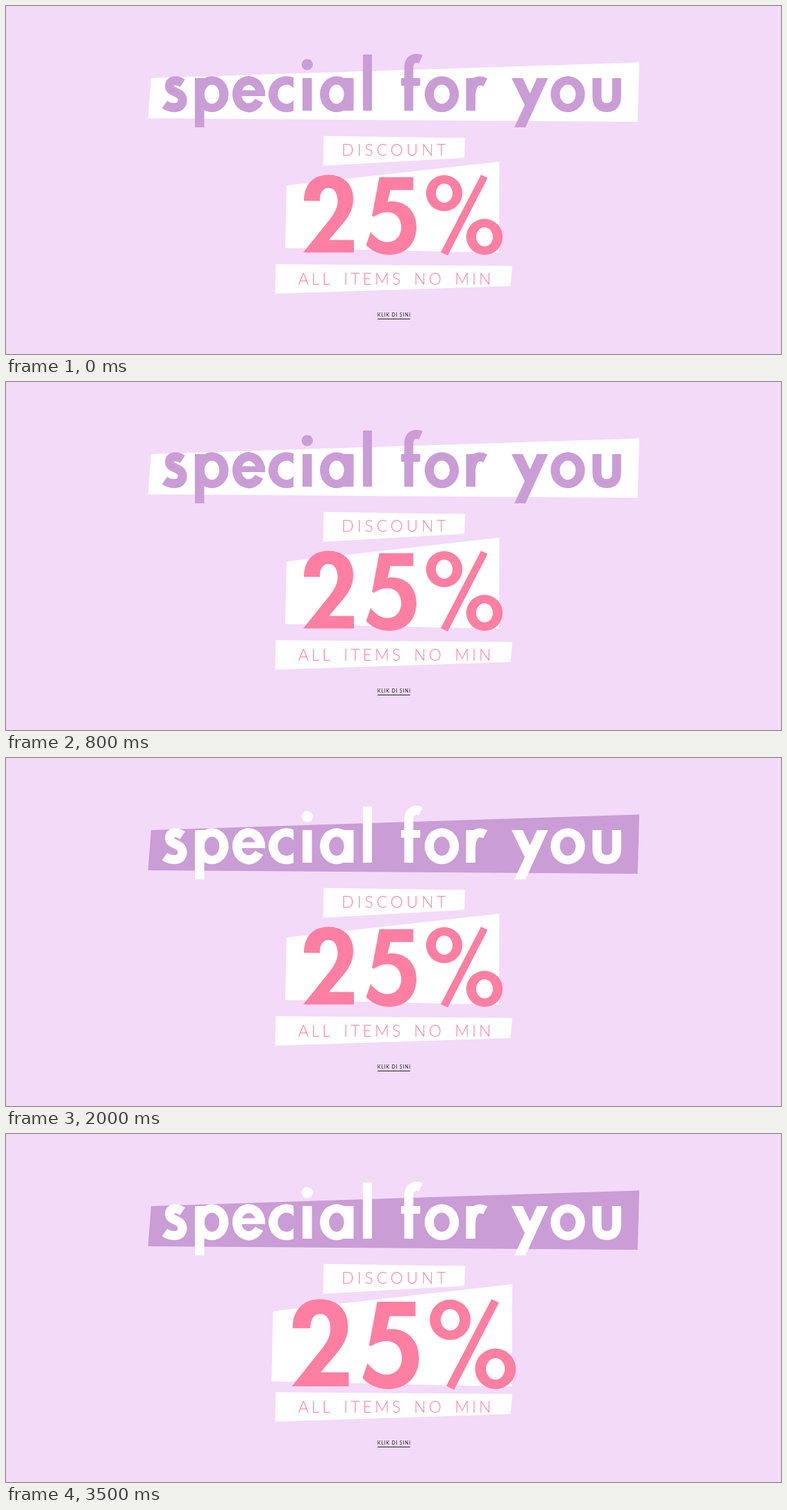
These frames come from a looping animation (1116x502 px, 4500 ms). An HTML page with a canvas:

```html
<!DOCTYPE html>
<html lang="id">
<head>
<meta charset="utf-8">
<title>Special for you</title>
<style>
  html, body { margin: 0; width: 100%; height: 100%; overflow: hidden; background: #f3daf8; }
  canvas { display: block; }
</style>
</head>
<body>
<canvas id="stage" width="1116" height="502" role="img"
  aria-label="special for you, discount 25%, all items no min, klik di sini"></canvas>
<script>
const ctx = document.getElementById('stage').getContext('2d');
const LOOP = 4500;
const BG = '#f3daf8', WHITE = '#ffffff', LILAC = '#ca9dd6', PINK = '#ff7fa3', INK = '#2a2030';

const banner = new Path2D('M209 104L912 81.5L909.5 167L204.5 162Z');
const tagTop = new Path2D('M457.5 187.5L661.5 190.5L660 219L456.5 230.5Z');
const tagBottom = new Path2D('M388.5 372.5L729 375L726.5 404L387.5 415Z');
const panel = new Path2D('M404 259L710.5 224.5L710 356L402 349Z');

function ring(path, cx, cy, rx, ry, ix, iy) {
  path.moveTo(cx + rx, cy);
  path.ellipse(cx, cy, rx, ry, 0, 0, Math.PI * 2);
  path.moveTo(cx + ix, cy);
  path.ellipse(cx, cy, ix, iy, 0, 0, Math.PI * 2);
}

function bowl(cx, rx) {
  const path = new Path2D();
  ring(path, cx, 127.2, rx, 26, rx - 13.3, 13.8);
  return path;
}

// Headline lettering: round bowls, straight parts and curved strokes
const bowls = [bowl(296.5, 24), bowl(476, 24), bowl(627.5, 24.7), bowl(809, 24.7)];
const cBowl = bowl(404, 26);
const cClip = new Path2D('M370 95H414V160H370Z');
const straight = new Path2D(
  'M272 104H285.5V175H272Z' +
  'M335 121.5H373V130H335Z' +
  'M427 104H440.5V151H427Z' +
  'M487 104H500.5V151H487Z' +
  'M514 70H527V151H514Z' +
  'M569 104H596.5V115H569Z' +
  'M662.5 104H676V151H662.5Z' +
  'M728 104H744L754.6 126L764.5 104H780.5L748 175H732L747 143Z');
straight.moveTo(442, 84.5);
straight.arc(433.8, 84.5, 8.1, 0, Math.PI * 2);

const curved = new Path2D(
  'M254.2 111.5C250.5 109 247.5 107.8 244 107.8C238.5 107.8 235.5 111 235.5 115' +
  'C235.5 121.5 241 123 245.5 125C251.5 127.5 254 131 254 136' +
  'C254 142.5 249.5 146.5 243 146.5C237.5 146.5 232.5 145 228.5 142' +
  'M580 151V89C580 80 584.5 75.5 591 75.5C594 75.5 596 76 597.3 76.6' +
  'M669.5 130C669.5 116 675 108 682 108C685 108 688 108.8 690.3 110' +
  'M851 104V131C851 141.5 856 146.5 865 146.5C874 146.5 879.3 141.5 879.3 131V104');
const eCurve = new Path2D();
eCurve.ellipse(349.5, 127.2, 17, 19.6, 0, Math.PI * 0.16, Math.PI * 2.04);

const digits = new Path2D(
  'M429 281C429 257 443 243.5 464 243.5C486 243.5 500 257 500 278' +
  'C500 291 496 301 484 315L465 337.5H501V355.5H428L466 308' +
  'C474 298 477.5 290 477.5 281C477.5 270 472.5 262.5 464.5 262.5' +
  'C456 262.5 451.8 270 451.8 281Z' +
  'M537.5 247H586.5V265.5H553.5L549.5 282.5C551.5 282 553 281.8 555 281.8' +
  'C577 281.8 591 297 591 319C591 343 575 359 552 359' +
  'C539 359 528 354.5 518.5 345L525 326C532 335 540 340.5 549 340.5' +
  'C561 340.5 569 332 569 319C569 306 561 297.5 549 297.5' +
  'C541 297.5 534 301 529.5 304L527 303Z');
const percent = new Path2D('M684 243.5L693.5 248L636 360L626 355Z');
ring(percent, 631, 270, 26.2, 26, 12, 13.8);
ring(percent, 689, 333, 26.2, 26, 12, 13.8);

function fill(path, color) {
  ctx.fillStyle = color;
  ctx.fill(path, 'evenodd');
}

function label(text, cx, y, font, spacing, wordGap, color) {
  ctx.font = `${font} Lato, sans-serif`;
  ctx.letterSpacing = spacing + 'px';
  ctx.wordSpacing = wordGap + 'px';
  ctx.textAlign = 'center';
  ctx.fillStyle = color;
  ctx.fillText(text, cx + spacing / 2, y);
}

function headline(color) {
  for (const b of bowls) fill(b, color);
  ctx.fillStyle = color;
  ctx.fill(straight);
  ctx.strokeStyle = color;
  ctx.lineWidth = 13;
  ctx.stroke(curved);
  ctx.stroke(eCurve);
  ctx.save();
  ctx.clip(cClip);
  fill(cBowl, color);
  ctx.restore();
}

function offer(scale) {
  ctx.save();
  ctx.translate(561.4, 287);
  ctx.scale(scale, scale);
  ctx.translate(-561.4, -287);
  fill(panel, WHITE);
  fill(digits, PINK);
  fill(percent, PINK);
  ctx.restore();
}

function draw(t) {
  const inverted = t >= 1000 || Math.floor(t / 200) % 2 === 1;
  const big = t >= 3500 || (t >= 1500 && Math.floor((t - 1500) / 500) % 2 === 0);

  ctx.fillStyle = BG;
  ctx.fillRect(0, 0, 1116, 502);
  fill(banner, inverted ? LILAC : WHITE);
  headline(inverted ? WHITE : LILAC);

  fill(tagTop, WHITE);
  fill(tagBottom, WHITE);
  offer(big ? 1.1235 : 1);
  label('DISCOUNT', 558.5, 216, '300 23px', 4.8, 0, PINK);
  label('ALL ITEMS NO MIN', 559.5, 402, '300 23px', 4, 5, PINK);

  label('KLIK DI SINI', 558.5, 447.5, '400 7px', 0.8, 0, INK);
  ctx.fillRect(535, 451, 47, 1);
}

const start = performance.now();
function tick() {
  draw((performance.now() - start) % LOOP);
  requestAnimationFrame(tick);
}
tick();
</script>
</body>
</html>
```
